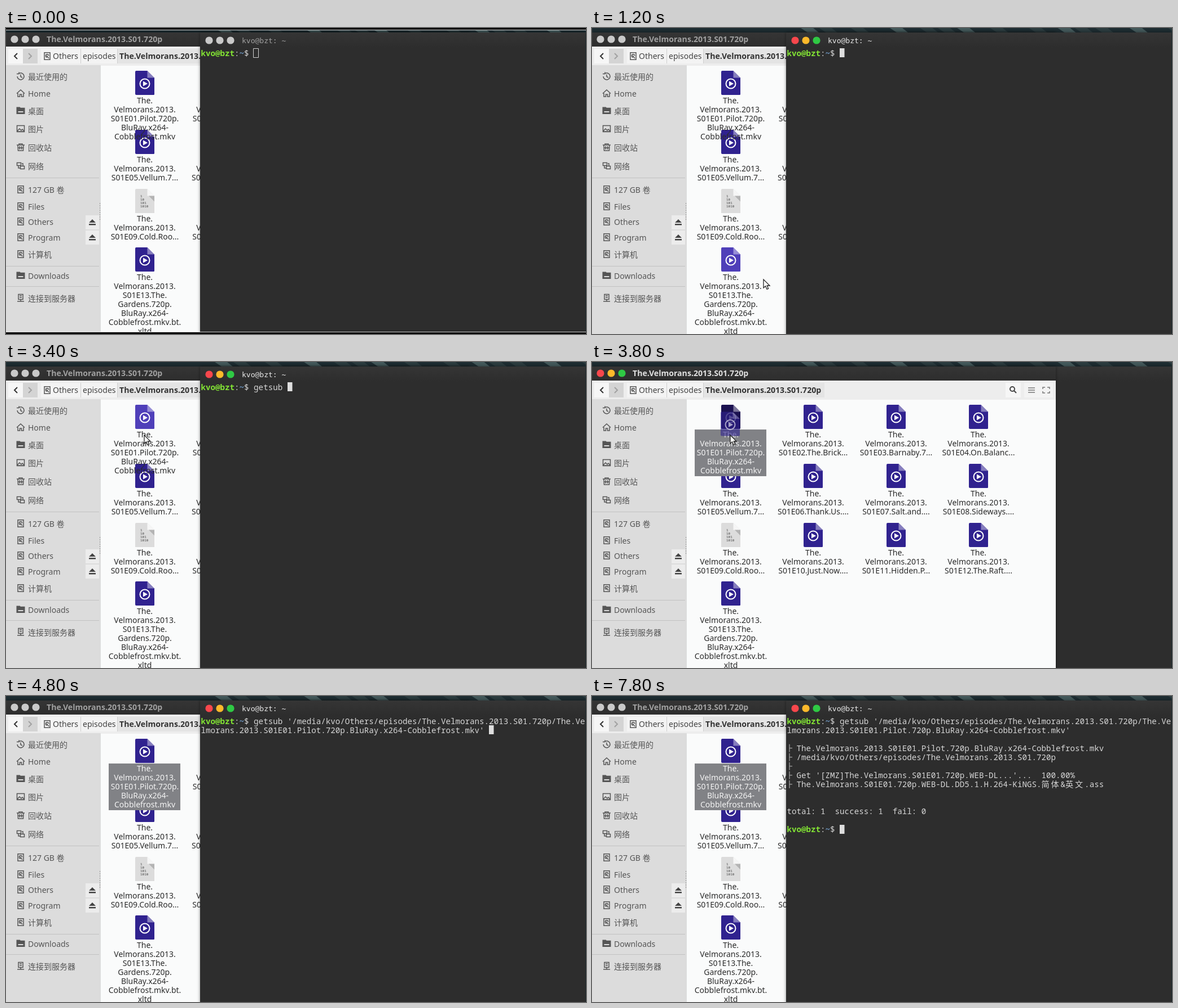
An HTML page with a canvas for the animation above (8000 ms loop, 1028x544 px).

```html
<!DOCTYPE html>
<html lang="zh">
<head>
<meta charset="utf-8">
<style>
html, body { margin: 0; width: 100%; height: 100%; overflow: hidden; background: #1d2c31; }
canvas { display: block; }
</style>
</head>
<body>
<canvas id="stage" width="1028" height="544"></canvas>
<script>
const ctx = document.getElementById('stage').getContext('2d');
const SANS = '"Noto Sans", "Noto Sans CJK SC", sans-serif';
const MONO = '"Noto Sans Mono", "Noto Sans CJK SC", monospace';
const BOLD = 'bold 14.1px ' + SANS;
const LOOP = 8000, STEP = 200;
const CELL = 8.51, ROW = 16.06;
const LIGHTS = ['#f8474c', '#fdb92b', '#2fc944'];

const SHOW = 'The.Velmorans', SEASON = SHOW + '.2013.S01.720p';
const VIDEO = SHOW + '.2013.S01E01.Pilot.720p.BluRay.x264-Cobblefrost.mkv';
const FOLDER = '/media/kvo/Others/episodes/' + SEASON;

const ICONS = {
  clock: 'M4 3.5A6 6 0 1 1 2 8M1 3.5h4v-3M8 4.5v4l3 1.5',
  home: 'M1 8.5L8 2l7 6.5M3 8v6h3.5v-4h3v4H13V8',
  folder: 'M2 3h4l1 1.2h7v.5H2zM2 7.5h12v5H2z',
  picture: 'M1.5 2.5h13v11h-13zM2 12l4-4 3 3 2-2 3 3v1H2z',
  trash: 'M1 4h14M5 4V2h6v2M3 4l.5 10h9L13 4M6.3 6v6M9.7 6v6M3 9h10',
  network: 'M1.5 2.5h7v5h-7zM7.5 8.5h7v5h-7zM4 8v4h3M10 4h2v4',
  disk: 'M3 1.8h10v12.4H3zM8 10a2.6 2.6 0 1 1 2.6-2.6M7 7l4 5',
  server: 'M4 1.5h8v9H4zM6 4h4M6 7h4M8 11v3M2 14h12'
};
const PLACES = [
  ['clock', '最近使用的', 87], ['home', 'Home', 117], ['folder', '桌面', 148],
  ['picture', '图片', 180], ['trash', '回收站', 213], ['network', '网络', 246],
  ['disk', '127 GB 卷', 288], ['disk', 'Files', 318], ['disk', 'Others', 345],
  ['disk', 'Program', 373], ['disk', '计算机', 403],
  ['folder', 'Downloads', 441], ['server', '连接到服务器', 481]
];

const TITLES = ['', 'The.Brick', 'Barnaby.7', 'On.Balanc', 'Vellum.7', 'Thank.Us.', 'Salt.and.',
  'Sideways.', 'Cold.Roo', 'Just.Now.', 'Hidden.P', 'The.Raft.', ''];
const files = TITLES.map((title, i) => {
  const rest = i === 0 ? ['S01E01.Pilot.720p.', 'BluRay.x264-', 'Cobblefrost.mkv']
    : i === 12 ? ['S01E13.The.', 'Gardens.720p.', 'BluRay.x264-', 'Cobblefrost.mkv.bt.', 'xltd']
    : [`S01E${String(i + 1).padStart(2, '0')}.${title}...`];
  return {
    x: 246 + Math.round(146.4 * (i % 4)),
    y: 97.5 + Math.round(104.8 * Math.floor(i / 4)),
    lines: ['The.', 'Velmorans.2013.', ...rest]
  };
});

// Pointer path: time, x, y
const PATH = [[200, 620, 330], [600, 500, 340], [1000, 304, 447], [2400, 304, 447],
  [3200, 245, 130], [3800, 245, 130], [4400, 907, 268], [4800, 907, 268]];

function pointerAt(t) {
  if (t < PATH[0][0] || t >= 4800) return null;
  const i = PATH.findIndex(p => p[0] > t);
  const [t0, x0, y0] = PATH[i - 1], [t1, x1, y1] = PATH[i];
  const k = (t - t0) / (t1 - t0);
  return { x: x0 + (x1 - x0) * k, y: y0 + (y1 - y0) * k };
}

function rect(x, y, w, h, color) {
  ctx.fillStyle = color;
  ctx.fillRect(x, y, w, h);
}

function text(s, x, y, color, font = '14px ' + SANS, align = 'left') {
  ctx.font = font;
  ctx.textAlign = align;
  ctx.fillStyle = color;
  ctx.fillText(s, x, Math.round(y + 5));
}

function shape(d, x, y, fill, stroke, width = 1) {
  const path = new Path2D(d);
  ctx.save();
  ctx.translate(x, y);
  if (fill) { ctx.fillStyle = fill; ctx.fill(path); }
  if (stroke) { ctx.strokeStyle = stroke; ctx.lineWidth = width; ctx.stroke(path); }
  ctx.restore();
}

function disc(x, y, r, color) {
  ctx.fillStyle = color;
  ctx.beginPath();
  ctx.arc(x, y, r, 0, 7);
  ctx.fill();
}

function lights(x, y, active) {
  LIGHTS.forEach((c, i) => disc(x + 19 * i, y, 6.6, active ? c : '#c9c9c9'));
}

function windowBase(x, y, w, h, color) {
  ctx.save();
  ctx.shadowColor = 'rgba(0,0,0,.45)';
  ctx.shadowBlur = 5;
  rect(x, y, w, h, color);
  ctx.restore();
}

function titleBar(x, y, w, h) {
  const g = ctx.createLinearGradient(0, y, 0, y + h);
  g.addColorStop(0, '#353535');
  g.addColorStop(1, '#2d2d2d');
  rect(x, y, w, h, g);
}

function placeIcon(name, x, y, color = '#555') {
  shape(ICONS[name], x, y - 8, null, color, name === 'folder' ? 3 : 1.5);
}

function desktop() {
  rect(0, 0, 1028, 544, '#1d2c31');
  for (let i = 0; i < 14; i++) {
    const x = 370 + i * 49 + 17 * Math.sin(i * 5);
    shape('M0 0h22l10 8H12z', x, 0, i % 3 ? '#2b3b3e' : '#43585a');
  }
}

function fileIcon(x, y, color, ring = '#fff') {
  shape('M-15 -21.5H4.5L17 -9V20q0 1.5 -1.5 1.5H-15q-2 0 -2 -2V-19.5q0 -2 2 -2z', x, y, color);
  shape('M4.5 -21.5L17 -9H4.5z', x, y, 'rgba(255,255,255,.42)');
  shape('M8.5 0a8.5 8.5 0 1 0 -17 0a8.5 8.5 0 1 0 17 0z', x, y + 1.5, null, ring, 2);
  shape('M-3 -4.5L5 0L-3 4.5z', x, y + 1.5, ring);
}

function binaryIcon(x, y) {
  shape('M-15 -21.5H4.5L17 -9V21.5H-17V-19.5q0 -2 2 -2z', x, y, '#dcdcdc');
  shape('M4.5 -21.5L17 -9H4.5z', x, y, '#f6f6f6');
  shape('M7 -9H17V1z', x, y, '#b4b4b4');
  ['1', '10', '101', '1010'].forEach((s, i) =>
    text(s, x - 8, y - 12 + 6.3 * i, '#777', 'bold 6px ' + MONO));
}

function fileManager(t, raised, pointer) {
  const selected = t >= 3800, dragging = t >= 3800 && t < 4400;
  windowBase(0, 8, 822, 540, '#fafbfb');
  titleBar(0, 8, 822, 26);
  lights(15, 20, raised);
  text(SEASON, 72, 20, raised ? '#e0e0e0' : '#a0a0a0', BOLD);

  rect(0, 33, 822, 34, '#ededed');
  rect(4, 37, 26, 26, '#f6f6f6');
  rect(30, 37, 26, 26, '#d4d4d4');
  shape('M3 -5L-2 0L3 5', 17, 50, null, '#333', 2);
  shape('M-2 -5L3 0L-2 5', 42, 50, null, '#a2a2a2', 2);
  rect(62, 37, 135, 26, '#f3f3f3');
  rect(197, 37, 215, 26, '#e4e4e4');
  rect(132, 37, 1, 26, '#cfcfcf');
  rect(197, 37, 1, 26, '#cfcfcf');
  placeIcon('disk', 65, 50);
  text('Others', 83, 50, '#444');
  text('episodes', 136, 50, '#444');
  text(SEASON, 201, 50, '#333', BOLD);
  rect(733, 37, 27, 26, '#f6f6f6');
  rect(766, 37, 51, 26, '#f3f3f3');
  shape('M4 0a4 4 0 1 0 -8 0a4 4 0 1 0 8 0M3 3L7 7', 745, 48, null, '#444', 2);
  shape('M-6 -4H6M-6 0H6M-6 4H6', 779, 50, null, '#777', 1.3);
  shape('M-6 -2V-5H-2M2 -5H6V-2M-6 2V5H-2M2 5H6V2', 805, 50, null, '#777', 1.5);

  rect(0, 66, 168, 478, '#dcdcdc');
  [266, 423, 459].forEach(y => rect(0, y, 165, 1, '#c2c2c2'));
  for (const [icon, label, y] of PLACES) {
    placeIcon(icon, 18, y - 1);
    text(label, 39, y, '#555');
  }
  for (const y of [345, 372]) {
    rect(141, y - 12, 24, 25, '#ececec');
    shape('M-6 1L0 -5L6 1zM-6 3H6V5.5H-6z', 153, y, '#444');
  }
  for (let y = 311; y < 340; y += 4) rect(166, y, 1, 2, '#999');

  const reachable = pointer && !dragging && (raised || pointer.x < 344);
  files.forEach((f, i) => {
    const hover = reachable && Math.abs(pointer.x - f.x) < 64 &&
      pointer.y > f.y - 21 && pointer.y < f.y + 80;
    if (i === 8) return binaryIcon(f.x, f.y);
    const dim = i === 0 && selected && raised;
    const color = dim ? '#1b1150' : hover ? '#4f3fb9' : '#30228f';
    fileIcon(f.x, f.y, color, dim ? '#8b8799' : '#fff');
  });
  files.forEach((f, i) => {
    const marked = i === 0 && selected;
    if (marked) rect(182, 120, 127, 83, '#818286');
    f.lines.forEach((s, n) =>
      text(s, f.x, f.y + 31.5 + 16 * n, marked ? '#f4f4f4' : '#2b2b2b', undefined, 'center'));
  });
}

// Writes on the terminal grid and returns the next column; CJK takes two cells.
function put(s, col, row, color = '#d6d6d6', weight = '') {
  for (const ch of s) {
    text(ch, 345.5 + col * CELL, 44.5 + row * ROW, color, `${weight} 14.18px ${MONO}`);
    col += ch > '\u2e80' ? 2 : 1;
  }
  return col;
}

function prompt(row) {
  let col = put('kvo@bzt', 0, row, '#82e234', 'bold');
  col = put(':', col, row);
  col = put('~', col, row, '#729fcf', 'bold');
  return put('$ ', col, row);
}

function branch(row, s) {
  shape('M0 -7V7M0 0H5', 350, 44.5 + row * ROW, null, '#bdbdbd');
  put(s, 2, row);
}

function caret(col, row, solid, glyph) {
  const x = Math.round(345.5 + col * CELL), y = Math.round(36 + row * ROW);
  if (solid) rect(x, y, 8.5, 16, '#dedede');
  else shape('M.5 .5H9.5V16.5H.5z', x - 1, y, null, '#d0d0d0');
  if (glyph) put(glyph, col, row, '#2d2d2d');
}

function terminalText(t, active) {
  let col = prompt(0);
  const typed = { 1400: 1, 1600: 3, 1800: 4, 2000: 6 };
  const count = t < 1400 ? 0 : typed[t] || 7;
  col = put('getsub '.slice(0, count), col, 0);
  if (t < 4400) return caret(col, 0, active);

  const command = `'${FOLDER}/${VIDEO}' `;
  put(command.slice(0, 80 - col), col, 0);
  const end = put(command.slice(80 - col), 0, 1);
  if (t < 5000) return caret(end, 1, active);
  if (t < 5200) return caret(0, 2, true);

  branch(3, VIDEO);
  if (t < 5400) return caret(0, 4, true);
  branch(4, FOLDER);
  if (t < 5600) return caret(0, 5, true);
  branch(5, '');
  if (t < 7000) {
    put('Searching ZIMUZU...', 2, 6);
    const spin = Math.max(0, Math.min(3, (t - 6000) / STEP));
    return caret(0, 6, true, '|/-\\'[spin]);
  }
  const percent = Math.min(100, 18.4 + (t - 7000) / STEP * 40.8).toFixed(2);
  branch(6, `Get '[ZMZ]${SHOW}.S01E01.720p.WEB-DL...'...  ${percent}%`);
  if (t < 7600) return caret(0, 6, true, '|');
  branch(7, SHOW + '.S01E01.720p.WEB-DL.DD5.1.H.264-KiNGS.简体&英文.ass');
  if (t < 7800) return caret(0, 8, true);
  put('total: 1  success: 1  fail: 0', 0, 10);
  caret(prompt(12), 12, true);
}

function terminal(t, active) {
  windowBase(344, 8, 683, 540, '#2d2d2d');
  titleBar(344, 8, 683, 27);
  lights(360, 22, active);
  text('kvo@bzt: ~', 418, 22, active ? '#e8e8e8' : '#a0a0a0', '13px "DejaVu Sans Mono", monospace');
  terminalText(t, active);
}

function drawPointer(p, t, raised) {
  if (t >= 3800 && t < 4400) {
    ctx.globalAlpha = .6;
    fileIcon(p.x, p.y - 20, '#30228f');
    ctx.globalAlpha = 1;
  } else if (p.x > (raised ? 822 : 344) && p.y > 35) {
    shape('M-3 -6H3M0 -6V6M-3 6H3', p.x, p.y, null, '#eee', 1.3);
    return;
  }
  shape('M0 0V15L3.5 11.8L6 17.5L8.6 16.4L6.2 11H11z', p.x, p.y, '#fff', '#222', 1.3);
}

function draw(t) {
  const raised = t >= 3800 && t < 4600;
  const pointer = pointerAt(t);
  desktop();
  if (raised) {
    terminal(t, false);
    fileManager(t, true, pointer);
  } else {
    fileManager(t, false, pointer);
    terminal(t, t >= 600);
  }
  if (t < STEP) {
    rect(0, 0, 1028, 3, '#050505');
    rect(0, 3, 1028, 1, '#d8d8d8');
    rect(0, 540, 1028, 1, '#d8d8d8');
    rect(0, 541, 1028, 3, '#050505');
  }
  if (pointer) drawPointer(pointer, t, raised);
}

function tick() {
  draw(Math.floor(performance.now() % LOOP / STEP) * STEP);
  requestAnimationFrame(tick);
}
tick();
</script>
</body>
</html>
```
